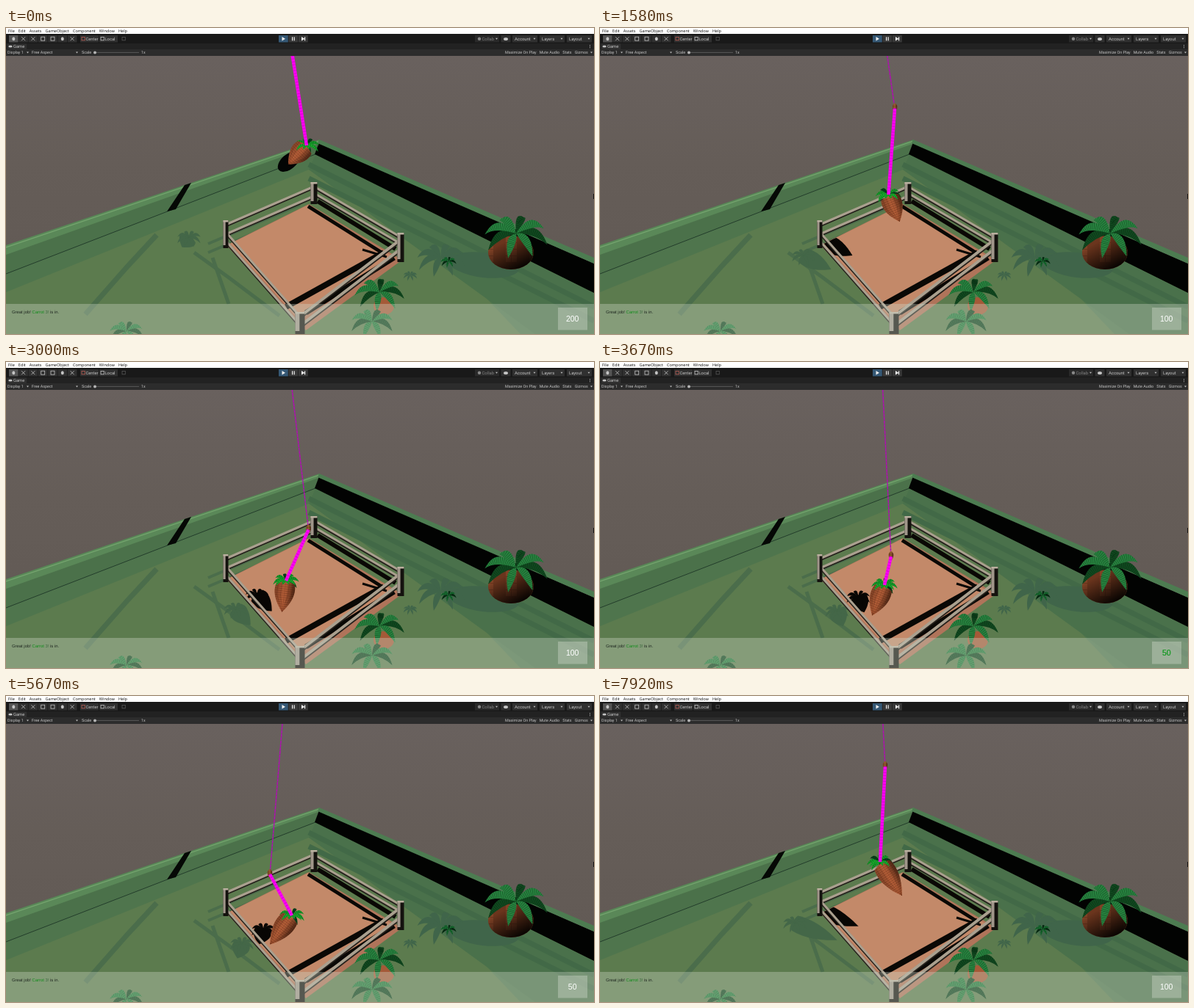
Write an HTML page with a canvas that moves like this. It is 800x417 px and loops after 8 s.

```html
<!DOCTYPE html>
<html lang="en">
<head>
<meta charset="utf-8">
<title>Carrot crane</title>
<style>
html, body { margin: 0; width: 100%; height: 100%; overflow: hidden; background: #191919; }
canvas { display: block; width: 100vw; height: 100vh; }
</style>
</head>
<body>
<canvas id="stage" width="800" height="417"></canvas>
<script>
const W = 800, H = 417, LOOP = 8000;
const ARIAL = '"Liberation Sans", Arial, sans-serif';
const screen = document.getElementById('stage').getContext('2d');
let g = screen;

function layer(paint) {
  const canvas = document.createElement('canvas');
  canvas.width = W;
  canvas.height = H;
  g = canvas.getContext('2d');
  g.textRendering = 'geometricPrecision';
  paint();
  g = screen;
  return canvas;
}
function trace(pts) {
  g.beginPath();
  for (let i = 0; i < pts.length; i += 2) g.lineTo(pts[i], pts[i + 1]);
}
function poly(color, ...pts) {
  trace(pts);
  g.fillStyle = color;
  g.fill();
}
function line(color, width, ...pts) {
  trace(pts);
  g.strokeStyle = color;
  g.lineWidth = width;
  g.stroke();
}
function rect(color, x, y, w, h) {
  g.fillStyle = color;
  g.fillRect(x, y, w, h);
}
function frame(color, x, y, size) {
  g.strokeStyle = color;
  g.lineWidth = 0.8;
  g.strokeRect(x, y, size, size);
}
function oval(color, x, y, rx, ry, turn = 0) {
  g.beginPath();
  g.ellipse(x, y, rx, ry, turn, 0, 7);
  g.fillStyle = color;
  g.fill();
}
function clipped(path, paint) {
  g.save();
  path();
  g.clip();
  paint();
  g.restore();
}
function gradient(x0, y0, x1, y1, ...colors) {
  const fill = g.createLinearGradient(x0, y0, x1, y1);
  colors.forEach((c, i) => fill.addColorStop(i / (colors.length - 1), c));
  return fill;
}
// Writes a string and returns the x where it ends.
function text(str, x, y, size, color, family = 'Roboto, sans-serif') {
  g.font = `${size}px ${family}`;
  g.fillStyle = color;
  g.fillText(str, x, y);
  return x + g.measureText(str).width;
}

// A leaf that rises from the crown, bends over and ends in a point.
function leaf(x, y, dx, dy, width, color, ribbed) {
  const reach = Math.hypot(dx, dy), nx = -dy / reach * width, ny = dx / reach * width;
  const mx = x + dx * 0.65, my = y + dy * 0.6 - reach * 0.35;
  const tipX = x + dx, tipY = y + dy + reach * 0.2;
  const path = () => {
    g.beginPath();
    g.moveTo(x, y);
    g.quadraticCurveTo(mx + nx, my + ny, tipX, tipY);
    g.quadraticCurveTo(mx - nx, my - ny, x, y);
  };
  path();
  g.fillStyle = color;
  g.fill();
  if (!ribbed) return;
  clipped(path, () => {
    g.beginPath();
    g.moveTo(x, y);
    g.quadraticCurveTo(mx, my, tipX, tipY);
    g.setLineDash([0.6, 2]);
    g.strokeStyle = 'rgba(0,25,8,.45)';
    g.lineWidth = width * 2;
    g.stroke();
    g.setLineDash([]);
  });
}
function crown(x, y, r, turn, lit, dark = lit) {
  const count = 8;
  for (let i = 0; i < count; i++) {
    const a = turn + i / count * 2 * Math.PI;
    leaf(x, y, Math.cos(a) * r, Math.sin(a) * r * 0.65, r * 0.25, i % 3 ? lit : dark, lit != dark);
  }
}

function carrotBody(x, y, vx, vy, half, color, meshed) {
  const length = Math.hypot(vx, vy);
  const path = () => {
    g.beginPath();
    g.moveTo(0, -half);
    g.bezierCurveTo(length * 0.4, -half * 1.4, length * 0.8, -half * 0.5, length, 0);
    g.bezierCurveTo(length * 0.8, half * 0.5, length * 0.4, half * 1.4, 0, half);
    g.quadraticCurveTo(-6, 0, 0, -half);
  };
  g.save();
  g.translate(x, y);
  g.rotate(Math.atan2(vy, vx));
  path();
  g.fillStyle = color;
  g.fill();
  if (meshed) clipped(path, () => {
    rect(gradient(0, -half, 0, half, 'rgba(15,5,0,.6)', 'rgba(15,5,0,0)', 'rgba(15,5,0,.3)'),
      -6, -half * 1.3, length + 9, half * 2.6);
    for (let u = 1; u < length; u += 3) line('rgba(50,18,6,.4)', 0.5, u, -half * 1.3, u, half * 1.3);
    for (let v = -0.8; v < 1; v += 0.4) line('rgba(50,18,6,.4)', 0.5, -5, v * half, length * 0.4, v * half, length, 0);
  });
  g.restore();
}

// Corners of the ring: left, back, right, front
const [LEFT, BACK, RIGHT, FRONT] = [[299, 268], [419, 216], [537, 285], [400, 393]];
function fence([x0, y0], [x1, y1], gap, width) {
  for (const d of [0, gap]) {
    line('#25211c', width + 1, x0, y0 + d + 1.5, x1, y1 + d + 1.5);
    line('#aaa08f', width, x0, y0 + d, x1, y1 + d);
  }
}
function post([x, y], height, width) {
  rect('#14120e', x - width / 2, y - 6, width, height);
  rect('#a0968a', x - width / 2, y - 6, width * 0.45, height - 4);
  rect('#bab09f', x - width / 2, y - 6, width, 2.5);
}
function tracePad() {
  trace([305, 294, 411, 241, 529, 313, 399, 398]);
}

const backdrop = layer(() => {
  rect(gradient(0, 38, 0, 330, '#69615e', '#655d58', '#625a55'), 0, 38, W, H);
  poly('#4f754d', 0, 334, 421, 171, 800, 360, 800, 417, 0, 417);
  poly('#5c7b4e', 0, 360, 412, 193, 560, 270, 700, 417, 0, 417);
  poly('#4a714b', 412, 193, 421, 173, 800, 362, 800, 417, 720, 417);
  for (const y of [186, 205]) line('#426947', 7, 412, y, 800, y + 194);

  // Arena walls
  poly('#4b714a', 0, 296, 427, 152, 421, 172, 0, 335);
  poly('#5a8858', 0, 296, 427, 152, 425, 158, 0, 309);
  line('#75a66f', 1.3, 0, 299, 425, 154.5);
  line('#233d2b', 1, 0, 335, 421, 172);
  poly('#020302', 426, 156, 800, 321, 800, 361, 420, 172);
  poly('#4d7c51', 426, 152, 800, 313, 800, 321, 424, 157);
  poly('#050805', 243, 214, 252, 211, 231, 247, 219, 250);

  // Cast shadows
  const shade = '#4b6d4b', deepShade = '#40654a';
  line(shade, 7, 205, 282, 166, 324, 108, 390);
  line(shade, 5, 256, 306, 303, 340, 372, 392);
  line(shade, 5, 281, 313, 303, 376);
  for (const d of [0, 12]) line(shade, 4, 275, 306 - d, 400, 253 - d);
  oval(deepShade, 650, 323, 48, 17, 0.12);
  crown(592, 313, 34, 0.3, deepShade);
  crown(550, 337, 10, 0.4, deepShade);

  // Ring floor with the shadows of its rails
  poly('#b0745a', 300, 296, 412, 240, 539, 316, 408, 412);
  clipped(tracePad, () => rect('#c38969', 0, 0, W, H));
  const dark = '#0a0805';
  line(dark, 5, 411, 243, 516, 309);
  line(dark, 6, 424, 236, 530, 301);
  line(dark, 8, 381, 380, 514, 306);
  line(dark, 7, 408, 388, 528, 313);
  line(dark, 3, 485, 302, 518, 312);
  fence(LEFT, BACK, 13, 3);
  fence(BACK, RIGHT, 9, 3);
  post(BACK, 30, 9);
});

const foreground = layer(() => {
  fence([LEFT[0], LEFT[1] + 10], FRONT, 12, 3);
  fence([RIGHT[0], RIGHT[1] + 3], FRONT, 13, 4);
  post(LEFT, 38, 7);
  post(RIGHT, 40, 9);
  post(FRONT, 30, 13);

  const lit = '#27823f', dark = '#10481f';
  const roundBody = () => {
    g.beginPath();
    g.ellipse(687, 306, 31, 23, 0, 0, 7);
  };
  clipped(roundBody, () => {
    rect('#6b351d', 650, 280, 80, 50);
    for (let i = 0; i < 32; i++) {
      if (i % 8 * 3 % 4 < 2) rect('rgba(150,78,46,.5)', 656 + i % 8 * 8, 284 + (i >> 3) * 9, 7, 8);
    }
    rect(gradient(680, 290, 700, 328, 'rgba(6,3,1,0)', '#060301'), 650, 280, 80, 50);
  });
  crown(694, 280, 44, 0.25, lit, dark);
  crown(602, 318, 11, 0.2, '#14682d', '#072c13');
  oval('#a45a38', 514, 379, 14, 12);
  crown(508, 360, 34, 0.1, lit, dark);
  crown(498, 400, 30, 0.4, lit, dark);
  crown(164, 413, 24, 0.3, lit, dark);

  rect('rgba(210,219,202,.35)', 0, 376, W, 41);
  rect('rgba(224,229,218,.34)', 751, 381, 40, 30.5);
  let x = 8;
  for (const [word, color] of [['Great job! ', '#202820'], ['Carrot ', '#108c19'], ['3! ', '#3e6940'], ['is in.', '#202820']]) {
    x = text(word, x, 389, 5.9, color, ARIAL);
  }
});

const chrome = layer(() => {
  const ink = '#c4c4c4', button = '#303030';
  const arrow = (x, y) => poly(ink, x, y, x + 3, y, x + 1.5, y + 2);
  rect('#fff', 0, 0, W, 8);
  let x = 3;
  for (const label of ['File', 'Edit', 'Assets', 'GameObject', 'Component', 'Window', 'Help']) {
    x = text(label, x, 6, 5.6, '#111', '"Open Sans", sans-serif') + 5;
  }
  rect('#191919', 0, 8, W, 13);
  rect('#222', 0, 21, W, 8);
  rect(button, 2, 21.5, 26, 7.5);
  rect('#2c2c2c', 0, 29, W, 9);

  // Tool buttons
  for (let i = 0; i < 7; i++) {
    const mid = 10.3 + i * 13.3;
    rect(i ? button : '#545454', mid - 6.3, 10, 12.6, 9.5);
    if (i == 0 || i == 5) oval(ink, mid, 14.7, 2, 2.5);
    else if (i == 3 || i == 4) frame(ink, mid - 2.5, 12.2, 5);
    else for (const s of [-1, 1]) line(ink, 0.8, mid - 2.5, 14.7 - s * 2.5, mid + 2.5, 14.7 + s * 2.5);
  }
  ['Center', 'Local'].forEach((label, i) => {
    const left = 101 + i * 26;
    rect(button, left, 10, 25, 9.5);
    frame(i ? ink : '#b65d54', left + 2, 12.5, 4.3);
    text(label, left + 7.5, 17, 5.8, ink);
  });
  frame('#555', 158, 12.5, 4.3);

  // Play, pause, step
  for (let i = 0; i < 3; i++) rect(i ? '#383838' : '#355875', 371 + i * 13.5, 10, 12.8, 9.5);
  for (const left of [375.5, 402]) poly('#eee', left, 12, left + 4.5, 14.7, left, 17.4);
  for (const left of [389, 391.6, 406]) rect('#eee', left, 12.3, 1.2, 5);

  rect('#292929', 638, 10, 33, 9.5);
  oval('#888', 644, 14.7, 2.2, 2.2);
  text('Collab', 647.5, 17, 5.9, '#838383');
  arrow(666, 13.8);
  rect(button, 673.5, 10, 13, 9.5);
  oval(ink, 680, 15, 3, 2);
  ['Account', 'Layers', 'Layout'].forEach((label, i) => {
    const left = 689 + i * 37;
    rect(button, left, 10, 34, 9.5);
    text(label, left + 3, 17, 5.9, ink);
    arrow(left + 28.5, 13.8);
  });

  oval(ink, 6, 25.2, 2.6, 1.4);
  text('Game', 10, 27.3, 5.8, ink);
  for (let i = 0; i < 3; i++) rect(ink, 794, 23 + i * 1.7, 0.9, 0.9);
  text('Display 1', 2, 35.2, 5.4, ink);
  text('Free Aspect', 35, 35.2, 5.4, ink);
  text('Scale', 103, 35.2, 5.4, ink);
  text('1x', 184, 35.2, 5.4, ink);
  x = 679;
  for (const label of ['Maximize On Play', 'Mute Audio', 'Stats', 'Gizmos']) x = text(label, x, 35.2, 5.4, ink) + 4;
  for (const left of [28, 95, 795]) arrow(left, 32.4);
  line('#6b6b6b', 0.7, 120, 33.4, 181, 33.4);
  oval('#b5b5b5', 121, 33.4, 2, 2);
});

// Swing key points: time, hinge x and y, carrot crown x and y, carrot tilt in degrees
const swing = [
  [0, 386, 14, 409, 160, 134],
  [750, 381, 42, 408, 172, 66],
  [2420, 418, 181, 379, 281, 84],
  [3670, 396, 265, 387, 304, 112],
  [5670, 359, 243, 389, 299, 127],
  [6830, 408, 146, 383, 215, 101],
  [7920, 388, 96, 381, 226, 57]
];
// A smooth cubic through the key points
function swingAt(t) {
  const i = swing.findLastIndex(key => key[0] <= t);
  const a = swing[i], b = swing[i + 1];
  if (!b) return a;
  const before = swing[i - 1] || a, after = swing[i + 2] || b;
  const span = b[0] - a[0], u = (t - a[0]) / span;
  return a.map((v, k) => {
    const rise = b[k] - v;
    const m0 = (b[k] - before[k]) / (b[0] - before[0]) * span;
    const m1 = (after[k] - v) / (after[0] - a[0]) * span;
    return v + u * (m0 + u * (3 * rise - 2 * m0 - m1 + u * (m0 + m1 - 2 * rise)));
  });
}

// The sun throws the shadow further to the lower left the higher the carrot hangs.
function castShadow(x, y, vx, vy, onPad, color) {
  const midX = x + vx / 2, midY = y + vy / 2, lift = 325 - midY;
  const sx = midX - 52 - lift * 0.66 + (onPad ? 29 : 0);
  const sy = midY + 25 + lift * 0.62 - (onPad ? 19 : 0);
  const wx = vx + vy * 0.6, wy = vy * 0.5;
  carrotBody(sx - wx / 2, sy - wy / 2, wx, wy, 11, color);
  crown(sx - wx / 2, sy - wy / 2, 17, 0.4, color);
}

const PIVOT = { x: 381.5, y: -28 };
const ropeSettings = [[0, 200], [500, 100], [3450, 50], [6300, 100]];

function draw(t) {
  const [, hingeX, hingeY, x, y, tilt] = swingAt(t);
  const angle = tilt * Math.PI / 180, length = 36 + t * 0.0024;
  const vx = Math.cos(angle) * length, vy = Math.sin(angle) * length;

  g.drawImage(backdrop, 0, 0);
  castShadow(x, y, vx, vy, false, '#446748');
  clipped(tracePad, () => castShadow(x, y, vx, vy, true, '#080604'));
  if (t < 450) oval('#030504', x - 24, y + 22, 18, 10, -0.7);

  g.setLineDash([4, 0.7]);
  line('#b10db3', 1.5, PIVOT.x, PIVOT.y, hingeX, hingeY);
  g.setLineDash([]);
  carrotBody(hingeX, hingeY - 4, 0, 10, 3, '#b0703c', true);

  crown(x, y, 18, angle + 0.5, '#159a29', '#07401a');
  carrotBody(x + vx * 0.1, y + vy * 0.1, vx * 0.9, vy * 0.9, 12.5, '#b86039', true);
  for (let i = -1; i < 3; i++) leaf(x, y, i * 9 - 5, 4, 4, '#18ab2c', true);

  line('#ff00f4', 4.5, hingeX, hingeY, x, y);
  g.setLineDash([1, 3]);
  line('rgba(157,0,160,.4)', 4.2, hingeX, hingeY, x, y);
  g.setLineDash([]);

  g.drawImage(foreground, 0, 0);
  const [since, setting] = ropeSettings.findLast(([start]) => start <= t);
  const pressed = since > 0 && t - since < 450;
  g.textAlign = 'center';
  text(setting, 770.7, 400.3, 10.5, pressed ? '#219b2d' : '#fff', ARIAL);
  if (pressed) text(setting, 771.1, 400.3, 10.5, '#219b2d', ARIAL);
  g.drawImage(chrome, 0, 0);
  rect('#111', 799, 226, 1, 7);
}

const start = performance.now();
function tick() {
  draw((performance.now() - start) % LOOP);
  requestAnimationFrame(tick);
}
tick();
</script>
</body>
</html>
```
